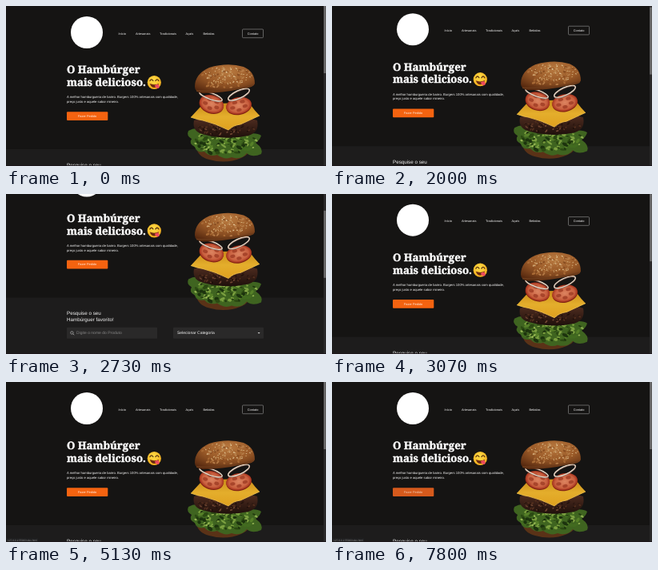
An HTML page that plays this animation: 400x200 px, repeating every 8000 ms.

```html
<!DOCTYPE html>
<html lang="pt">
<head>
<meta charset="utf-8">
<title>Hamburgueria</title>
<style>
  html, body { margin: 0; width: 100%; height: 100%; overflow: hidden; background: #151413; }
  svg { display: block; width: 100vw; height: 100vh; }
  text { font-family: "Liberation Sans", Arial, sans-serif; fill: #f4f4f4; text-rendering: geometricPrecision; }
  .title { font: 700 13.2px "Noto Serif", serif; fill: #fff; stroke: #fff; stroke-width: .4px; }
  .copy { font-size: 4.18px; }
  .nav { font-size: 3.9px; }
  .lead { font-size: 6.25px; }
  .field { font-size: 5px; }
  .mid { text-anchor: middle; }
</style>
</head>
<body>
<svg viewBox="0 0 400 200">
  <defs>
    <radialGradient id="bun" cx=".55" cy=".25" r=".8">
      <stop offset="0" stop-color="#b97a40"/><stop offset=".5" stop-color="#9a5a28"/><stop offset="1" stop-color="#57290f"/>
    </radialGradient>
    <linearGradient id="cheese" x2="0" y2="1">
      <stop offset="0" stop-color="#c98a18"/><stop offset=".5" stop-color="#e4ae2c"/><stop offset="1" stop-color="#dfa01f"/>
    </linearGradient>
    <linearGradient id="patty" x2="0" y2="1">
      <stop offset="0" stop-color="#553022"/><stop offset="1" stop-color="#1f100c"/>
    </linearGradient>
    <radialGradient id="tomato">
      <stop offset="0" stop-color="#dc8460"/><stop offset=".75" stop-color="#c9603f"/><stop offset="1" stop-color="#a5321d"/>
    </radialGradient>
    <radialGradient id="emoji" cx=".45" cy=".35" r=".7">
      <stop offset="0" stop-color="#ffe04a"/><stop offset="1" stop-color="#f5a818"/>
    </radialGradient>
  </defs>

  <g id="page">
    <rect y="-5" width="400" height="184" fill="#151413"/>
    <rect y="179" width="400" height="90" fill="#1d1c1c"/>
    <circle cx="101" cy="33" r="20" fill="#fff"/>

    <g class="nav" id="menu"></g>
    <rect x="295.5" y="29" width="26" height="10.7" rx="1" fill="none" stroke="#999" stroke-width=".6"/>
    <text class="nav mid" x="308.5" y="35.6">Contato</text>

    <text class="title" x="76" y="84.4">O Hambúrger</text>
    <text class="title" x="76" y="100.1">mais delicioso.</text>
    <g transform="translate(185.3 95.5)">
      <circle r="8.6" fill="url(#emoji)"/>
      <path d="M-5.4-2q2-3.4 4 0M1.6-2q2-3.4 4 0" fill="none" stroke="#5b3210" stroke-width="1.3" stroke-linecap="round"/>
      <path d="M-5.5 1.6Q0 4 5.8 1.4Q4 6.6 0 6.6T-5.5 1.6" fill="#6b2a12"/>
      <path d="M.5 4q2.6-2 5-1.2q2 3.6-.4 4.6q-2.8.6-4.6-3.4" fill="#ee4b5c"/>
    </g>

    <text class="copy" x="76" y="115.4">A melhor hamburgueria de bairro. Burgers 100% artesanais com qualidade,</text>
    <text class="copy" x="76" y="121.1">preço justo e aquele sabor mineiro.</text>
    <rect id="order" x="76" y="132.3" width="51.3" height="10.7" rx="1"/>
    <text id="orderText" class="nav mid" x="101.5" y="139">Fazer Pedido</text>

    <g id="burger"></g>

    <text class="lead" x="76" y="201">Pesquise o seu</text>
    <text class="lead" x="76" y="208.3">Hambúrguer favorito!</text>
    <rect x="76" y="216.4" width="113" height="13.8" rx="1" fill="#2a2929"/>
    <rect x="209" y="216.4" width="113" height="13.8" rx="1" fill="#2a2929"/>
    <path d="M83.6 224.2l1.6 1.6" stroke="#ccc" stroke-width=".7"/>
    <circle cx="82.4" cy="223" r="1.7" fill="none" stroke="#ccc" stroke-width=".6"/>
    <text class="field" x="88" y="225" style="fill:#858585">Digite o nome do Produto</text>
    <text class="field" x="214" y="225">Selecionar Categoria</text>
    <path d="M314.6 222.6h3l-1.5 1.8z" fill="#ccc"/>
  </g>

  <rect x="397" width="3" height="200" fill="#2a292a"/>
  <rect id="thumb" x="397.2" width="2.6" height="84" fill="#6c6b6c"/>
  <rect y="199.2" width="400" height=".8" fill="#1c1419"/>
  <g id="status">
    <rect y="195" width="40" height="4.6" fill="#1f1f20"/>
    <text x="2" y="198.6" style="font-size:3.2px;fill:#8b8b8b">127.0.0.1:5500/index.html</text>
  </g>
</svg>

<script>
const $ = id => document.getElementById(id);

let seed = 11;
const random = () => (seed = seed * 16807 % 2147483647) / 2147483647;
const between = (a, b) => a + (b - a) * random();
const repeat = (n, draw) => Array.from({ length: n }, (_, i) => draw(i)).join('');
const ellipse = (x, y, rx, ry, angle, style) =>
  `<ellipse rx="${rx}" ry="${ry}" transform="translate(${x} ${y}) rotate(${angle})" ${style}/>`;
const shape = (d, fill) => `<path d="${d}" fill="${fill}"/>`;

// Random blobs inside an ellipse, used for seeds, meat grain and leaf ruffles.
const scatter = (n, cx, cy, rx, ry, size, colors) => repeat(n, i => {
  const a = between(0, 2 * Math.PI), r = Math.sqrt(random());
  return ellipse(cx + rx * r * Math.cos(a), cy + ry * r * Math.sin(a),
    size * between(.7, 1.3), size * between(.35, .7), between(-60, 60), `fill="${colors[i % colors.length]}"`);
});

function tomato(x, y, rx, ry, angle) {
  const seeds = repeat(5, i => {
    const a = i * Math.PI * .4 + .4;
    return ellipse(rx * .52 * Math.cos(a), ry * .52 * Math.sin(a), rx * .2, ry * .2, 0, 'fill="#a8452b"');
  });
  return `<g transform="translate(${x} ${y}) rotate(${angle})">` +
    ellipse(0, 1, rx, ry, 0, 'fill="#7e2113"') +
    ellipse(0, 0, rx, ry, 0, 'fill="url(#tomato)"') + seeds + '</g>';
}

const onion = (x, y, rx, ry, angle) =>
  ellipse(x, y + .6, rx, ry, angle, 'fill="none" stroke="#8d6c60" stroke-width="1.6"') +
  ellipse(x, y, rx, ry, angle, 'fill="none" stroke="#e9dccb" stroke-width="1.2"');

$('burger').innerHTML =
  shape('M238 176Q239 188 254 192Q275 198 294 190Q306 185 306 174', '#5a3217') +
  shape('M228 156Q238 150 250 156L300 160Q314 158 319 162Q317 168 312 171Q322 178 319 185Q308 190 301 184Q294 193 282 189Q274 193 264 186Q254 189 248 182Q238 184 236 176Q228 172 232 166Q225 162 228 156', '#3f6420') +
  scatter(75, 273, 171, 39, 14, 3.2, ['#568028', '#2c4a13', '#7ba040', '#426b20', '#1c330e']) +
  scatter(45, 273, 170, 42, 14, 1.8, ['#94b452', '#7da03f', '#20380f']) +
  shape('M235 143Q232 158 249 161Q276 168 303 162Q317 158 314 143Q276 132 235 143', 'url(#patty)') +
  scatter(75, 274, 154, 36, 8, 1.6, ['#6f4632', '#2c1710', '#54301f', '#1d0e0a']) +
  shape('M243 126L231 139Q239 142 246 143Q262 147 278 155Q284 149 293 148Q306 142 317 137Q311 131 306 124Q274 118 243 126', 'url(#cheese)') +
  '<path d="M231 139Q239 142 246 143Q262 147 278 155Q284 149 293 148Q306 142 317 137" fill="none" stroke="#f0c250" stroke-width=".8"/>' +
  tomato(257, 122.5, 15.5, 11, 18) + tomato(291, 124.5, 16, 10.5, -12) +
  onion(256, 112.5, 15, 4, 20) + onion(291, 110.5, 14.5, 4.8, -25) +
  shape('M236 101Q236 85 254 77Q277 70 297 76Q311 82 311 97Q310 102 296 103Q270 109 246 109Q236 108 236 101', 'url(#bun)') +
  '<path d="M238 106Q272 108 309 99" fill="none" stroke="#6b3b1b" stroke-width="1.6"/>' +
  scatter(50, 274, 90, 34, 13, 2, ['#a86a35', '#8a4e22', '#b57b46']) +
  scatter(85, 275, 87, 32, 11, .95, ['#e8cfa0', '#d6b27c', '#c79a62']);

$('menu').innerHTML = [['Início', 140.5], ['Artesanais', 162], ['Tradicionais', 192], ['Açaís', 224.5], ['Bebidas', 246.5]]
  .map(([label, x]) => `<text x="${x}" y="35.6">${label}</text>`).join('');

const ramp = (t, start, end) => Math.min(1, Math.max(0, (t - start) / (end - start)));
const smooth = p => p * p * (3 - 2 * p);
const mix = (from, to, p) => `rgb(${from.map((v, i) => Math.round(v + (to[i] - v) * p))})`;

function draw(t) {
  const scroll = 50 * (smooth(ramp(t, 1920, 2400)) - smooth(ramp(t, 2710, 3090)));
  $('page').setAttribute('transform', `translate(0 ${-scroll})`);
  $('thumb').setAttribute('y', scroll * .42);

  $('status').setAttribute('opacity', ramp(t, 3950, 4200) - ramp(t, 6700, 6870) + ramp(t, 7440, 7530));

  const hover = ramp(t, 7440, 7800);
  $('order').style.fill = mix([244, 99, 16], [214, 90, 28], hover);
  $('orderText').style.fill = mix([255, 238, 226], [240, 205, 182], hover);
}

function tick() {
  draw(performance.now() % 8000);
  requestAnimationFrame(tick);
}
tick();
</script>
</body>
</html>
```
